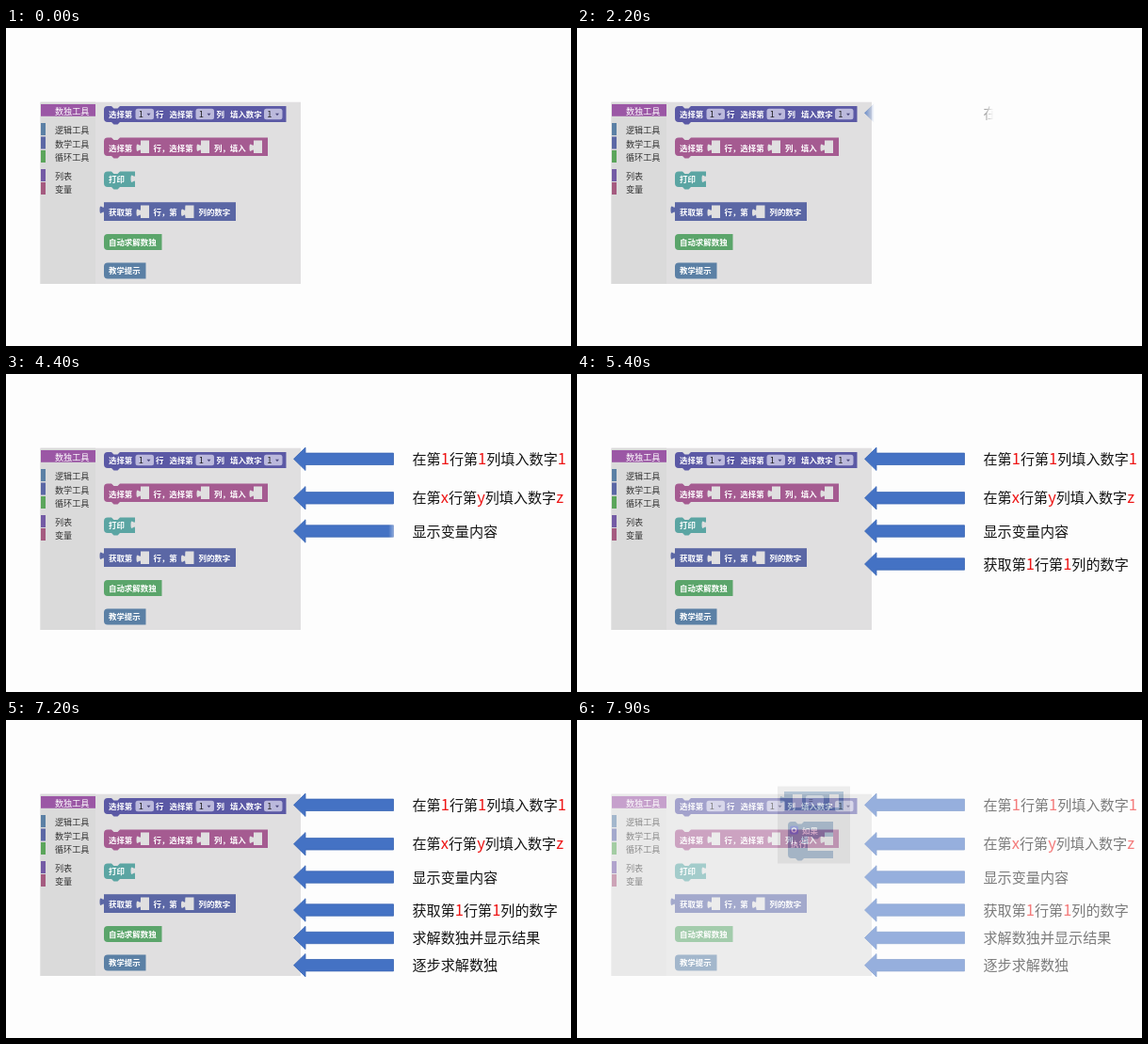
Write an HTML page that moves like this. It is 600x338 px and loops after 8 s.

```html
<!DOCTYPE html>
<html lang="zh-CN">
<head>
<meta charset="utf-8">
<title>积木说明</title>
<style>
html, body { margin: 0; width: 100%; height: 100%; overflow: hidden; background: #fdfdfd; }
svg { display: block; width: 100vw; height: 100vh; }
text { font-family: "Noto Sans CJK SC", "Noto Sans CJK", "Noto Sans CJK JP", sans-serif; }
</style>
</head>
<body>
<svg id="stage" viewBox="0 0 600 338" preserveAspectRatio="none"></svg>
<script>
const LOOP = 8000, WIPE = 500, FADE_START = 7500, FADE = 600;
const FLYOUT = '#e0dfe0', SIDEBAR = '#dadada';

const rect = (x, y, w, h, fill, rx = 0) =>
  `<rect x="${x}" y="${y}" width="${w}" height="${h}" rx="${rx}" fill="${fill}"/>`;
const label = (x, cy, s, size, fill, weight = 400) =>
  `<text x="${x}" y="${cy + size * 0.37}" font-size="${size}" fill="${fill}" font-weight="${weight}">${s}</text>`;
const white = (x, cy, s) => label(x, cy, s, 8.45, '#fff', 700);

// Statement block: notch on the top edge, matching tab below.
const statement = (x, y, w, h, fill) =>
  `<path fill="${fill}" d="M${x} ${y + 4}q0-4 4-4h4l2.5 2.5h4l2.5-2.5H${x + w}v${h}H${x + 17}l-2.5 2.5h-4l-2.5-2.5h-4q-4 0-4-4z"/>`;

// Standalone block: only the left corners are round.
const cap = (x, y, w, h, fill) =>
  `<path fill="${fill}" d="M${x} ${y + 4}q0-4 4-4H${x + w}v${h}H${x + 4}q-4 0-4-4z"/>`;

// Puzzle-shaped knob on the left of (x, y).
const knob = (x, y, fill) =>
  `<path fill="${fill}" d="M${x} ${y}v2.5c0 5.5-4.5-4.5-4.5 4.2s4.5-1.4 4.5 4.2h.5V${y}z"/>`;
const socket = (x, y) => rect(x, y, 9, 13.5, FLYOUT) + knob(x, y + 1, FLYOUT);

const field = (x, cy, fill = '#bbb9dc') =>
  rect(x, cy - 5.8, 19.5, 11.6, fill, 2.5) + label(x + 3.3, cy, '1', 9.4, '#222') +
  `<path d="M${x + 12} ${cy - 0.7}h4l-2 2.4z" fill="#4d4a80"/>`;

function sidebar() {
  const items = [
    ['逻辑工具', 108, '#5b80a5'], ['数学工具', 122.5, '#5b67a5'], ['循环工具', 137, '#5ba55b'],
    ['列表', 157, '#745ba5'], ['变量', 171, '#a55b80']
  ];
  return rect(36.5, 78.7, 58.5, 193.3, SIDEBAR) + rect(37, 81, 58, 12.8, '#9b57a5') +
    label(52, 88.5, '数独工具', 9.1, '#fff') +
    items.map(([s, y, c]) => rect(37, y - 7, 5, 13, c) + label(52, y + 0.7, s, 9.1, '#333')).join('');
}

function blocks() {
  return statement(104, 83, 193.5, 17, '#5b59a5') +
    white(109, 92, '选择第') + field(137.5, 91.5) + white(159, 92, '行') +
    white(173.5, 92, '选择第') + field(201.5, 91.5) + white(223.5, 92, '列') +
    white(238, 92, '填入数字') + field(274, 91.5) +

    statement(104, 116.5, 174, 19.5, '#a55b91') +
    white(109, 127.5, '选择第') + socket(143, 119.5) + white(156.5, 127.5, '行，选择第') +
    socket(207, 119.5) + white(221, 127.5, '列，填入') + socket(263, 119.5) +

    statement(104, 152.5, 33, 16.5, '#5ba5a3') +
    white(109, 161, '打印') + knob(137, 153.5, FLYOUT) +

    rect(104, 185.2, 140, 19.8, '#5b67a5') + knob(104, 186.5, '#5b67a5') +
    white(109, 196.3, '获取第') + socket(143, 188.5) + white(156.5, 196.3, '行，第') +
    socket(190.5, 188.5) + white(204.5, 196.3, '列的数字') +

    cap(104, 219, 61.5, 17, '#5ba56b') + white(109, 227.8, '自动求解数独') +
    cap(104, 249.5, 44.5, 17, '#5b80a5') + white(109, 258.3, '教学提示');
}

// [centre y, start time, text box width, text]; digits and letters turn red.
const rows = [
  [90.3, 2158, 174, '在第1行第1列填入数字1'],
  [131.8, 3095, 174, '在第x行第y列填入数字z'],
  [167, 3940, 105, '显示变量内容'],
  [202, 4795, 168, '获取第1行第1列的数字'],
  [231.5, 5690, 150, '求解数独并显示结果'],
  [260.7, 6560, 105, '逐步求解数独']
];
const wipes = [];

function wiped(x, w, y, start, content) {
  const id = wipes.length;
  wipes.push({ x, w, start });
  return `<linearGradient id="g${id}" gradientUnits="userSpaceOnUse" y1="0" y2="0">
    <stop offset="0" stop-color="#fff"/><stop offset="1" stop-color="#fff" stop-opacity="0"/></linearGradient>
    <mask id="m${id}" maskUnits="userSpaceOnUse" x="${x - 2}" y="${y - 18}" width="${w + 6}" height="36">
    <rect x="${x - 2}" y="${y - 18}" width="${w + 6}" height="36" fill="url(#g${id})"/></mask>
    <g id="w${id}" mask="url(#m${id})">${content}</g>`;
}

function row([y, start, w, s]) {
  const arrow = `<path d="M305.5 ${y}l12.5-12.2v6H411.5v12.4H318v6z" fill="#4472c4" stroke="#3a66b4" stroke-width=".8"/>`;
  const rich = s.replace(/[0-9a-z]/g, c => `<tspan font-size="16.5" fill="#ee1515">${c}</tspan>`);
  return wiped(305, 107, y, start, arrow) +
    wiped(425, w, y, start, label(431.5, y, rich, 15.1, '#151515'));
}

function nextSlide() {
  const blue = '#5b80a5', grey = '#dbdbdb';
  return rect(0, 0, 600, 338, '#fdfdfd') + rect(213, 70.5, 77, 82, grey) +
    rect(220, 76, 63, 20, blue) + knob(220, 78, blue) +
    rect(229, 79, 10, 14, grey) + rect(243, 80, 19, 11, '#b9c9d9', 2.5) +
    label(246, 85.5, '=', 8.4, '#222') + rect(268, 79, 10, 14, grey) +
    `<path fill="${blue}" d="M224 112q0-4 4-4h4l2.5 2.5h4l2.5-2.5H272v16H258l-2.5 2.5h-4l-2.5-2.5h-4v15H272v8H241l-2.5 2.5h-4l-2.5-2.5h-4q-4 0-4-4z"/>` +
    rect(226, 112.5, 9, 9, '#3a50c8', 2) + `<circle cx="230.5" cy="117" r="2.2" fill="none" stroke="#fff" stroke-width="1.2"/>` +
    white(239, 117.5, '如果') + white(227, 132, '执行');
}

const stage = document.getElementById('stage');
stage.innerHTML = `<g id="next">${nextSlide()}</g><g id="slide">${rect(0, 0, 600, 338, '#fdfdfd')}
  ${rect(36.5, 78.7, 276.5, 193.3, FLYOUT)}${sidebar()}${blocks()}${rows.map(row).join('')}</g>`;

const get = id => document.getElementById(id);
const clamp = v => Math.min(1, Math.max(0, v));
wipes.forEach((wipe, i) => { wipe.grad = get('g' + i); wipe.group = get('w' + i); });

function draw(t) {
  for (const { x, w, start, grad, group } of wipes) {
    const p = clamp((t - start) / WIPE), soft = w * 0.13;
    const front = x + p * (w + soft + 4);
    grad.setAttribute('x1', front - soft);
    grad.setAttribute('x2', front);
    group.setAttribute('visibility', p > 0 ? 'visible' : 'hidden');
  }
  const fade = clamp((t - FADE_START) / FADE) ** 2;
  get('slide').setAttribute('opacity', 1 - fade);
  get('next').setAttribute('visibility', fade > 0 ? 'visible' : 'hidden');
}

const origin = performance.now();
function tick() {
  draw((performance.now() - origin) % LOOP);
  requestAnimationFrame(tick);
}
tick();
</script>
</body>
</html>
```
